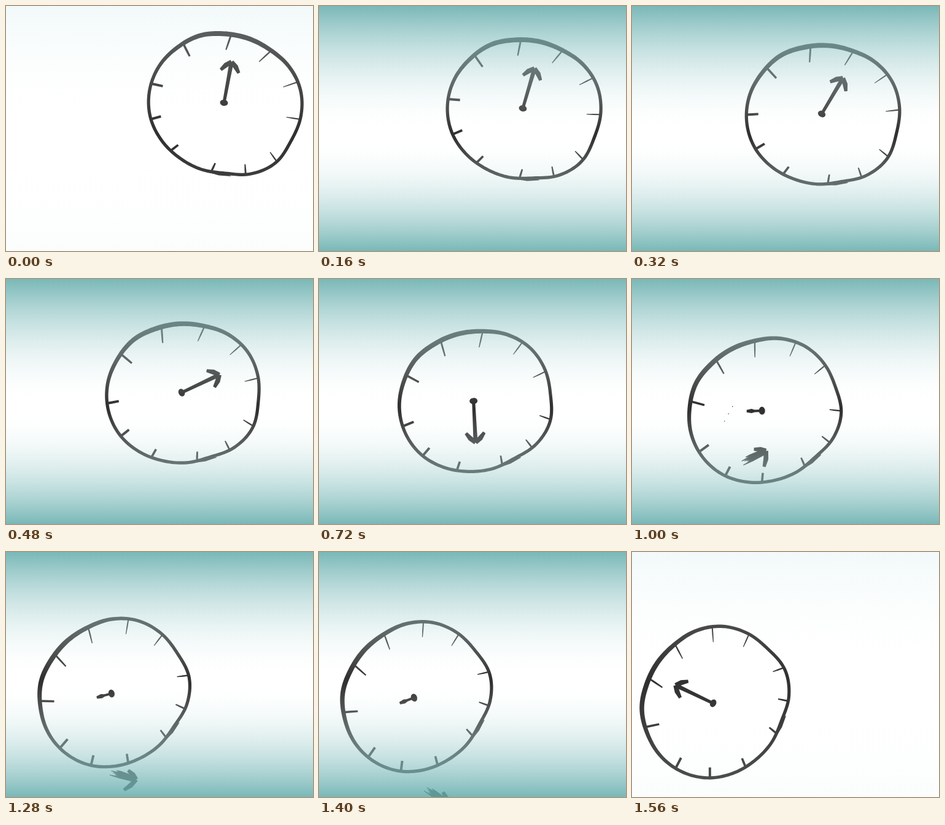
An HTML page with a canvas for the animation above (1600 ms loop, 500 by 400 pixels).

```html
<!DOCTYPE html>
<html>
<head>
<meta charset="utf-8">
<style>
html, body { margin: 0; width: 500px; height: 400px; overflow: hidden; background: #fff; }
canvas { display: block; }
</style>
</head>
<body>
<canvas width="500" height="400"></canvas>
<script>
const ctx = document.querySelector('canvas').getContext('2d');
const LOOP = 1600, STEP = 40, BREAK = 845, RESET = 1560, FADE = 160;
const RAD = Math.PI / 180;

// Radius of the hand-drawn dial every 20 degrees, clockwise from the top
const RADII = [113.5, 112.5, 114, 120, 124.5, 125, 123.5, 127, 122.4,
  114, 114.5, 116, 120, 124, 125, 123.5, 120, 118];
const TICK_ANGLES = [-35, 5, 41, 73.5, 102, 138.5, 164, 191.5, 229, 258, 285];
// Broken-off head: time, x, y, angle
const FALL = [[BREAK, 165, 196, 278], [1000, 221, 279, 420], [1280, 215, 372, 462]];

const mix = (a, b, k) => a.map((v, i) => v + (b[i] - v) * k);
const polar = (degrees, r) => [Math.sin(degrees * RAD) * r, -Math.cos(degrees * RAD) * r];
const radius = i => RADII[(i + RADII.length) % RADII.length];

function dialRadius(degrees) {
  const i = Math.floor(degrees / 20), k = degrees / 20 - i;
  const [a, b, c, d] = [-1, 0, 1, 2].map(n => radius(i + n));
  return b + k / 2 * (c - a + k * (2 * a - 5 * b + 4 * c - d + k * (3 * (b - c) + d - a)));
}

// Fills a stroke of varying width through points [x, y, width]
function brush(points) {
  const left = [], right = [], last = points.length - 1;
  points.forEach(([x, y, w], i) => {
    const p = points[Math.max(i - 1, 0)], q = points[Math.min(i + 1, last)];
    const dx = q[0] - p[0], dy = q[1] - p[1], s = w / 2 / Math.hypot(dx, dy);
    left.push([x + dy * s, y - dx * s]);
    right.unshift([x - dy * s, y + dx * s]);
  });
  ctx.beginPath();
  for (const [x, y] of left.concat(right)) ctx.lineTo(x, y);
  ctx.fill();
}

function drawDial() {
  const ring = [];
  for (let a = 0; a <= 362; a += 2) {
    const width = 5.2 + 2.8 * Math.max(0, Math.cos((a - 5) * RAD)) ** 2;
    ring.push([...polar(a, dialRadius(a)), width]);
  }
  brush(ring);
  brush([[-31, 110, 3], [-10, 115, 5], [9, 118.5, 1]]);
}

function drawTick(angle) {
  const [x, y] = polar(angle, dialRadius(angle));
  const length = 21 + 6 * Math.cos((angle - 30) * RAD);
  const lean = 5 + 9 * Math.cos(2 * angle * RAD);
  const [dx, dy] = polar(angle + 180 + lean, length);
  const width = 3 - Math.sin(angle * RAD);
  brush([[x, y, width], [x + dx / 2, y + dy / 2, width], [x + dx, y + dy, width * width / 4]]);
}

// Arrow head with its tip at the origin, pointing up
function drawHead(left, right) {
  for (const side of [-left, right])
    brush([[side, 19, 5], [side * 0.55, 10, 8], [0, 3, 7]]);
}

function drawHand(whole) {
  ctx.beginPath();
  ctx.ellipse(0, 0, 6.5, 5, 0, 0, 7);
  ctx.fill();
  if (whole) {
    brush([[0, 0, 5], [0, -40, 6], [0, -66, 7]]);
    ctx.translate(0, -71);
    drawHead(15, 15);
  } else {
    brush([[0, 0, 4], [0, -12, 4], [0, -17, 7], [0, -25, 4]]);
  }
}

function drawClock(t, age) {
  ctx.save();
  ctx.translate(357 - 0.1432 * t, 159 + 0.0553 * t);
  ctx.rotate(-0.048 * t * RAD);
  drawDial();
  TICK_ANGLES.forEach(drawTick);
  const u = Math.min(age, BREAK) / 160;
  ctx.translate(-2, -1);
  ctx.rotate((10.5 + 12.9 * u - 1.3 * u * u + 1.86 * u ** 3) * RAD);
  drawHand(age < BREAK);
  ctx.restore();
}

function drawPieces(age) {
  if (age < BREAK) return;
  const [a, b] = age < FALL[1][0] ? FALL : FALL.slice(1);
  const [, x, y, angle] = mix(a, b, (age - a[0]) / (b[0] - a[0]));
  ctx.save();
  ctx.translate(x, y);
  ctx.rotate(angle * RAD);
  drawHead(12, 21);
  for (let i = -2; i <= 2; i++)
    brush([[i * 1.5, 5, 4], [i * 2.2 - 2, 30, 3.5], [i * 2.4 - 3, 42 + 5 * Math.sin(i * 4), 1]]);
  ctx.restore();
  if (age < 1120)
    for (let i = 0; i < 3; i++)
      ctx.fillRect(163 - 6.5 * i, 207.5 + 12 * i + (age - 1000) * 0.1, 1.3, 1.3);
}

function drawHaze(k) {
  const haze = (edge, middle, from) => {
    const g = ctx.createLinearGradient(0, edge, 0, middle);
    g.addColorStop(0, `rgba(${mix(from, [98, 171, 171, 0.85], k)})`);
    g.addColorStop(1, 'rgba(255,255,255,0)');
    ctx.fillStyle = g;
    ctx.fillRect(0, Math.min(edge, middle), 500, Math.abs(middle - edge));
  };
  haze(0, 205, [214, 236, 238, 0.3]);
  haze(400, 215, [230, 244, 242, 0.17]);
}

function frame(now) {
  const t = Math.floor(now % LOOP / STEP) * STEP;
  const age = t % RESET;
  ctx.fillStyle = '#fff';
  ctx.fillRect(0, 0, 500, 400);
  ctx.fillStyle = '#313131';
  drawClock(t, age);
  drawPieces(age);
  drawHaze(Math.min(age / FADE, 1));
  requestAnimationFrame(frame);
}
requestAnimationFrame(frame);
</script>
</body>
</html>
```
